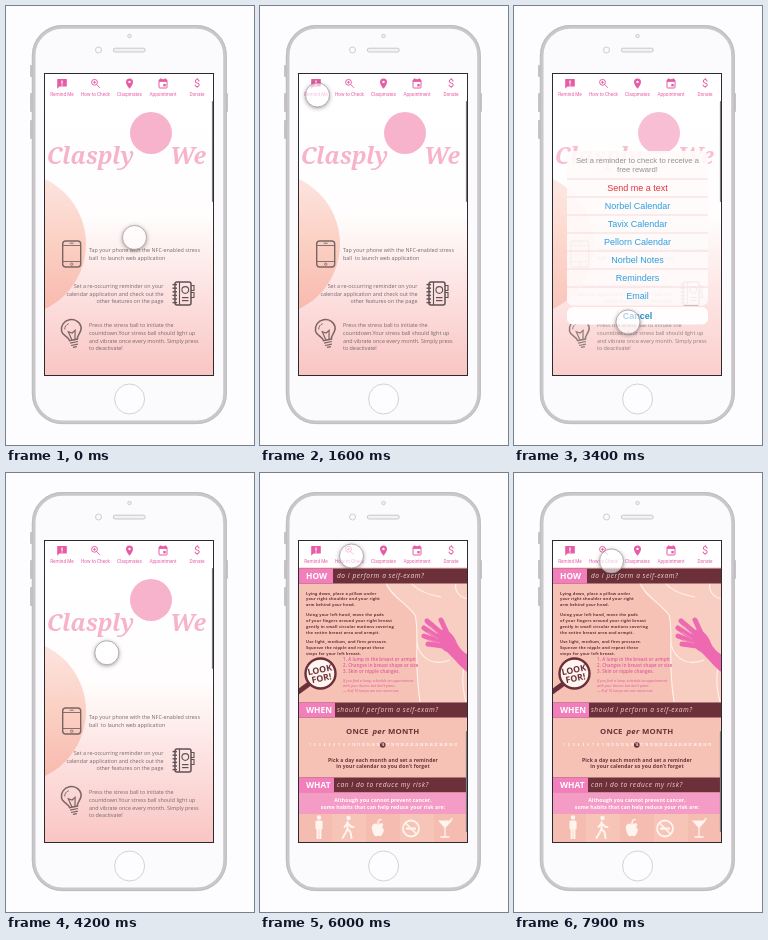
Recreate the animation shown at these times as an HTML page with a canvas. Size 248 by 439 pixels, loop 8000 ms.

```html
<!DOCTYPE html>
<html lang="en">
<head>
<meta charset="utf-8">
<title>Reminder app demo</title>
<style>
html, body { margin: 0; width: 100%; height: 100%; overflow: hidden; background: #fdfcfe; }
canvas { display: block; width: 248px; height: 439px; }
</style>
</head>
<body>
<canvas id="stage"></canvas>
<script>
const W = 248, H = 439, LOOP = 8000;
const SCROLL = 276;
const PINK = '#e85ba6', HOT = '#f27ebb', BROWN = '#6b3039', PEACH = '#f6c2b5', INK = '#75696a';
const LOGO = '#f7b3cb', ICON = '#7b6562';
const canvas = document.getElementById('stage');
const ctx = canvas.getContext('2d');
const dpr = window.devicePixelRatio || 1;
canvas.width = W * dpr;
canvas.height = H * dpr;

const clamp = v => Math.max(0, Math.min(1, v));
const ease = v => v * v * (3 - 2 * v);
const ramp = (t, a, b) => ease(clamp((t - a) / (b - a)));

function rect(x, y, w, h, fill) {
  ctx.fillStyle = fill;
  ctx.fillRect(x, y, w, h);
}

function paint(fill, stroke, lw) {
  if (fill) { ctx.fillStyle = fill; ctx.fill(); }
  if (stroke) { ctx.strokeStyle = stroke; ctx.lineWidth = lw; ctx.stroke(); }
}

function round(x, y, w, h, r, fill, stroke, lw = 1) {
  ctx.beginPath();
  ctx.roundRect(x, y, w, h, r);
  paint(fill, stroke, lw);
}

function disc(x, y, r, fill, stroke, lw = 1) {
  ctx.beginPath();
  ctx.arc(x, y, r, 0, Math.PI * 2);
  paint(fill, stroke, lw);
}

function shape(d, fill, stroke, lw = 1) {
  const p = new Path2D(d);
  if (fill) { ctx.fillStyle = fill; ctx.fill(p); }
  if (stroke) { ctx.strokeStyle = stroke; ctx.lineWidth = lw; ctx.stroke(p); }
}

// y is the vertical middle of the line
function text(s, x, y, font, color, align = 'left', gap = 0) {
  ctx.font = font;
  ctx.letterSpacing = gap + 'px';
  ctx.textAlign = align;
  ctx.textBaseline = 'alphabetic';
  const size = parseFloat(font.match(/([\d.]+)px/)[1]);
  ctx.fillStyle = color;
  ctx.fillText(s, x, y + size * 0.34);
}

const sans = (size, style = '') => `${style} ${size}px "Open Sans", sans-serif`;
const arial = (size, style = '') => `${style} ${size}px "Liberation Sans", Arial, sans-serif`;

function at(x, y, draw) {
  ctx.save();
  ctx.translate(x, y);
  draw();
  ctx.restore();
}

function phone() {
  rect(0, 0, W, H, '#fdfcfe');
  for (const [y, h] of [[59, 12], [87, 19], [114, 19]]) round(24, y, 3, h, 1, '#c6c4c8');
  round(219.5, 87, 2.5, 19, 1, '#c6c4c8');
  round(27.7, 20.9, 191.3, 395.4, 28.5, '#fbfafd', '#cac7cb', 3.6);
  round(26.3, 19.5, 194.1, 398.2, 30, null, '#bab7bb', 0.7);
  disc(123.5, 30, 1.8, '#eeedf0', '#c2c0c5', 0.7);
  disc(92.5, 44, 3, '#fbfafd', '#c2c0c5', 0.8);
  round(107.3, 42.2, 32, 3.8, 1.9, '#f2f1f4', '#bdbbc0', 0.8);
  disc(123.6, 393, 15, '#fdfcfe', '#cfccd1', 0.9);
}

function nav() {
  rect(39, 68, 169, 26.5, '#fff');
  const labels = ['Remind Me', 'How to Check', 'Claspmates', 'Appointment', 'Donate'];
  const xs = [56, 89.5, 123.5, 157, 191];
  labels.forEach((s, i) => text(s, xs[i], 88, '4.7px Roboto, sans-serif', PINK, 'center'));
  at(56, 77.5, () => {
    shape('M-4.8 -4.5H4.8V3H-2.5L-4.8 5.2Z', PINK);
    rect(-0.6, -3, 1.2, 3.3, '#fff');
    rect(-0.6, 1, 1.2, 1.1, '#fff');
  });
  at(89.5, 77.5, () => {
    disc(-1, -1.2, 2.9, null, PINK, 1);
    shape('M1.2 1L4.4 4.3M-2.4 -1.2H0.4M-1 -2.6V0.2', null, PINK, 0.9);
  });
  at(123.5, 77.5, () => {
    shape('M0 5.3C-2 2.5 -3.5 0.5 -3.5 -1.6A3.5 3.5 0 0 1 3.5 -1.6C3.5 0.5 2 2.5 0 5.3Z', PINK);
    disc(0, -1.6, 1.2, '#fff');
  });
  at(157, 77.5, () => {
    round(-4, -3.7, 8, 8.2, 0.8, null, PINK, 1);
    rect(-4, -4, 8, 2.4, PINK);
    rect(-2.8, -5.2, 1.1, 2, PINK);
    rect(1.7, -5.2, 1.1, 2, PINK);
    rect(0.3, 0.5, 2.4, 2.4, PINK);
  });
  text('$', 191, 77.3, '11px Roboto, sans-serif', PINK, 'center');
}

function phoneIcon() {
  round(-9, -13, 18, 26, 3, null, ICON, 1.4);
  shape('M-9 -8.5H9M-9 7.5H9M-2 -10.8H2', null, ICON, 0.9);
  disc(0, 10.2, 1.2, null, ICON, 0.8);
}

function bookIcon() {
  const c = '#5f5253';
  round(-9, -11.5, 16, 23, 2, null, c, 1.5);
  shape('M-4.5 -11.5V11.5M7 -8H10V-3H7M7 -1H10V4H7', null, c, 1.1);
  for (let i = 0; i < 6; i++) rect(-11.5, -9.6 + i * 3.6, 4.5, 1.4, c);
  disc(1.3, -3.5, 3.4, null, c, 1.1);
  rect(-2, 3.5, 6.5, 1.2, c);
  rect(-2, 6.5, 6.5, 1.2, c);
}

function bulbIcon() {
  ctx.rotate(-0.2);
  shape('M-4 6C-4 2 -10 0 -10 -5A10 9.5 0 0 1 10 -5C10 0 4 2 4 6Z', null, ICON, 1.5);
  shape('M-4 8.5H4M-3.5 11H3.5M-2 13.3H2M-1.5 6L-3.5 -3L0 -1L3.5 -3L1.5 6', null, ICON, 1.2);
  shape('M-6.5 -6A6 6 0 0 1 -1.5 -10.8', null, ICON, 0.9);
}

function home() {
  const bg = ctx.createLinearGradient(0, 94, 0, 370);
  bg.addColorStop(0, '#ffffff');
  bg.addColorStop(0.42, '#fffdfd');
  bg.addColorStop(0.6, '#fdebea');
  bg.addColorStop(1, '#f9c5c3');
  rect(38, 94, 170, 276.5, bg);

  const ball = ctx.createLinearGradient(0, 170, 0, 305);
  ball.addColorStop(0, '#fde5e0');
  ball.addColorStop(0.5, '#fbd0c4');
  ball.addColorStop(1, '#f9b9ae');
  disc(8, 238, 72, ball);
  shape('M40 238L50 222L55 228L66 214M46 242L58 230L63 234L74 222', null, 'rgba(253,218,160,.5)', 0.8);

  const logo = 'italic bold 23.2px "Noto Serif", serif';
  text('Clasply', 84.5, 150, logo, LOGO, 'center');
  text('We', 182, 150, logo, LOGO, 'center');
  disc(145, 127, 21, LOGO);

  const lines = (list, x, y, step, align) =>
    list.forEach((s, i) => text(s, x, y + i * step, sans(5.4), INK, align));
  lines(['Tap your phone with the NFC-enabled stress', 'ball  to launch web application'], 83, 244, 7.8);
  lines(['Set a re-occurring reminder on your', 'calendar application and check out the',
    'other features on the page'], 157.5, 280.3, 7.6, 'right');
  lines(['Press the stress ball to initiate the', 'countdown.Your stress ball should light up',
    'and vibrate once every month. Simply press', 'to deactivate!'], 83, 319.5, 7.7);
  at(65.7, 248, phoneIcon);
  at(178, 287.5, bookIcon);
  at(66.3, 328, bulbIcon);
}

function bar(y, word, width, question) {
  rect(38, y, 170, 15, BROWN);
  rect(38, y, width, 15, HOT);
  text(word, 46, y + 7.7, sans(8.4, 'bold'), '#fff');
  text(question, 77, y + 7.5, sans(6.6, 'italic'), '#f7cfc9', 'left', 0.53);
}

function torso() {
  ctx.save();
  ctx.beginPath();
  ctx.rect(124, 110, 84, 119);
  ctx.clip();
  shape('M126 110C130 122 146 130 155 142C160 158 153 184 160 229H208V110Z', '#f8cec2');
  shape('M126 110C130 122 146 130 155 142C160 158 153 184 160 229M151 110C158 118 168 122 181 124M196 110C194 118 199 124 208 126M157 162C155 184 172 194 190 187M205 190C201 204 203 218 206 229',
    null, '#fff2ec', 1.1);
  // hand with four fingers and a thumb
  ctx.lineCap = 'round';
  for (const [x, y, a, b] of [[181, 160, 167, 148], [179, 165, 164, 155], [180, 169, 164, 163], [183, 173, 168, 171], [187, 160, 181, 147]]) {
    shape(`M${x} ${y}L${a} ${b}`, null, '#ee69b0', 5);
  }
  shape('M178 158C185 154 193 160 196 168C199 176 204 180 212 184V202C201 196 195 186 187 179C180 176 174 165 178 158Z', '#ee69b0');
  shape('M179 161L170 153M178 166L168 159M180 170L169 167', null, '#f797c9', 0.7);
  ctx.restore();
}

function lens() {
  ctx.lineCap = 'round';
  shape('M49 211L38 219', null, BROWN, 5);
  disc(60.5, 200.5, 15, '#fff5f0', BROWN, 2.4);
  at(60.5, 200.5, () => {
    ctx.rotate(-0.2);
    text('LOOK', 0, -3.6, sans(8.8, 'bold'), BROWN, 'center');
    text('FOR!', 0, 4.8, sans(8.8, 'bold'), BROWN, 'center');
  });
}

function habits() {
  for (let i = 0; i < 5; i++) rect(38 + i * 34, 341, 34, 29.5, i % 2 ? '#f7c4b8' : '#f5bcb1');
  const c = '#fff4ee';
  ctx.lineCap = 'round';
  at(59, 354, () => {
    disc(0, -9.5, 2.2, c);
    round(-3.6, -6.5, 7.2, 9, 1.5, c);
    rect(-2.4, 0, 2.1, 12, c);
    rect(0.3, 0, 2.1, 12, c);
  });
  at(87.5, 354, () => {
    disc(1, -9, 2.2, c);
    shape('M0 -5L0 2L3 5L4 11M0 2L-2 6L-5 11M0 -4L4 0L6 0M0 -4L-3 0', null, c, 2);
  });
  at(118, 355.5, () => {
    shape('M0 -4C-4 -7 -7 -3 -6 1C-5 6 -3 9 0 7C3 9 5 6 6 1C4 0 4 -3 5.5 -4C4 -6 2 -5 0 -4Z', c);
    shape('M0 -5C0 -8 2 -9 3 -9', null, c, 1.5);
  });
  at(151, 355.5, () => {
    disc(0, 0, 8, null, c, 1.8);
    rect(-5, -1, 10, 2.2, c);
    shape('M-5.5 -5.5L5.5 5.5', null, c, 1.7);
  });
  at(185, 355.5, () => {
    shape('M-7 -8H7L0 0Z', c);
    shape('M0 0V8M-4 8.5H4M3 -5L7 -10', null, c, 1.3);
  });
}

function guide() {
  rect(38, 94, 170, 277, PEACH);
  torso();
  bar(95.5, 'HOW', 35, 'do I perform a self-exam?');
  const steps = [
    [120.3, 'Lying down, place a pillow under', 'your right shoulder and your right', 'arm behind your head.'],
    [142, 'Using your left hand, move the pads', 'of your fingers around your right breast',
      'gently in small circular motions covering', 'the entire breast area and armpit.'],
    [169, 'Use light, medium, and firm pressure.', 'Squeeze the nipple and repeat these', 'steps for your left breast.']
  ];
  for (const [y, ...rows] of steps) {
    rows.forEach((s, i) => text(s, 46, y + i * 5.8, sans(4, 'bold'), BROWN, 'left', 0.17));
  }
  ['1. A lump in the breast or armpit', '2. Changes in breast shape or size', '3. Skin or nipple changes.']
    .forEach((s, i) => text(s, 83, 187 + i * 5.8, sans(4.4, '600'), '#e4569f', 'left', 0.12));
  ['If you find a lump, schedule an appointment', 'with your doctor, but don\u2019t panic.', '\u2014 8 of 10 lumps are not cancerous.']
    .forEach((s, i) => text(s, 83, 207.5 + i * 5.2, sans(3.6, 'italic'), '#e4569f'));
  lens();

  bar(229.5, 'WHEN', 37, 'should I perform a self-exam?');
  text('ONCE', 86, 258, sans(7.8, 'bold'), BROWN, 'left', 0.2);
  text('per', 112.5, 258, sans(7.8, 'italic bold'), BROWN, 'left', 0.2);
  text('MONTH', 128, 258, sans(7.8, 'bold'), BROWN, 'left', 0.2);
  for (let i = 0; i < 31; i++) {
    const x = 50 + i * 4.85;
    if (i === 15) disc(x, 272, 2.8, BROWN);
    text(String(i + 1), x, 272, sans(2.7, 'bold'), '#fff', 'center');
  }
  text('Pick a day each month and set a reminder', 123, 287, sans(5, 'bold'), BROWN, 'center', 0.13);
  text('in your calendar so you don\u2019t forget', 123, 293.5, sans(5, 'bold'), BROWN, 'center', 0.13);

  bar(304.5, 'WHAT', 36, 'can I do to reduce my risk?');
  rect(38, 319.5, 170, 22, '#f59cc6');
  text('Although you cannot prevent cancer,', 123, 327.3, sans(5.1, 'bold'), '#fff', 'center', 0.1);
  text('some habits that can help reduce your risk are:', 123, 333.8, sans(5.1, 'bold'), '#fff', 'center', 0.1);
  habits();
}

function sheet(alpha) {
  if (!alpha) return;
  ctx.save();
  ctx.globalAlpha = alpha;
  rect(38, 94, 170, 276.5, 'rgba(255,255,255,.15)');
  round(53, 145, 141, 154.5, 6, 'rgba(255,251,251,.91)');
  ['Set a reminder to check to receive a', 'free reward!']
    .forEach((s, i) => text(s, 123.5, 154 + i * 9, arial(7.7), '#929092', 'center'));
  const items = ['Send me a text', 'Norbel Calendar', 'Tavix Calendar', 'Pellorn Calendar', 'Norbel Notes', 'Reminders', 'Email'];
  items.forEach((s, i) => {
    const y = 182 + i * 18;
    rect(53, y - 9.5, 141, 1, '#f5dcda');
    text(s, 123.5, y, arial(9), i ? '#2c9fe0' : '#e0343c', 'center');
  });
  round(53, 301, 141, 17.5, 6, '#fffdfd');
  text('Cancel', 123.5, 309.5, arial(9, 'bold'), '#2c8fca', 'center');
  ctx.restore();
}

// time, x, y of the touch point
const path = [
  [0, 128.5, 231.5], [800, 71, 103], [1200, 57.5, 89], [2700, 57.5, 89], [3350, 114, 316],
  [3700, 114, 316], [4600, 91.5, 83], [7500, 91.5, 83], [7900, 97.5, 88], [8000, 98, 89]
];

function touch(t) {
  const i = path.findIndex((p, n) => n && t <= p[0]);
  const [t0, x0, y0] = path[i - 1], [t1, x1, y1] = path[i];
  const k = ramp(t, t0, t1);
  const x = x0 + (x1 - x0) * k, y = y0 + (y1 - y0) * k;
  // keep the shadow outside so the translucent middle stays white
  ctx.save();
  ctx.beginPath();
  ctx.rect(0, 0, W, H);
  ctx.arc(x, y, 12, 0, Math.PI * 2);
  ctx.clip('evenodd');
  ctx.shadowColor = 'rgba(60,40,45,.5)';
  ctx.shadowBlur = 4 * dpr;
  ctx.shadowOffsetY = dpr;
  disc(x, y, 12, '#fff');
  ctx.restore();
  disc(x, y, 12, 'rgba(255,255,255,.62)', 'rgba(140,130,134,.7)', 0.9);
}

function draw(t) {
  ctx.setTransform(dpr, 0, 0, dpr, 0, 0);
  phone();
  const k = ramp(t, 5150, 5750);
  ctx.save();
  ctx.beginPath();
  ctx.rect(38, 67, 170, 303);
  ctx.clip();
  if (k < 1) at(0, -SCROLL * k, home);
  if (k > 0) at(0, SCROLL * (1 - k), guide);
  sheet(ramp(t, 2700, 2950) * (1 - ramp(t, 3600, 3800)));
  nav();
  round(205.9, 95 + 163 * k, 1.4, 101, 0.7, '#7d7a7f');
  touch(t);
  ctx.restore();
  ctx.strokeStyle = '#2c2a2d';
  ctx.lineWidth = 1;
  ctx.strokeRect(38.5, 67.5, 169, 302);
}

const start = performance.now();
function tick() {
  draw((performance.now() - start) % LOOP);
  requestAnimationFrame(tick);
}
tick();
</script>
</body>
</html>
```
